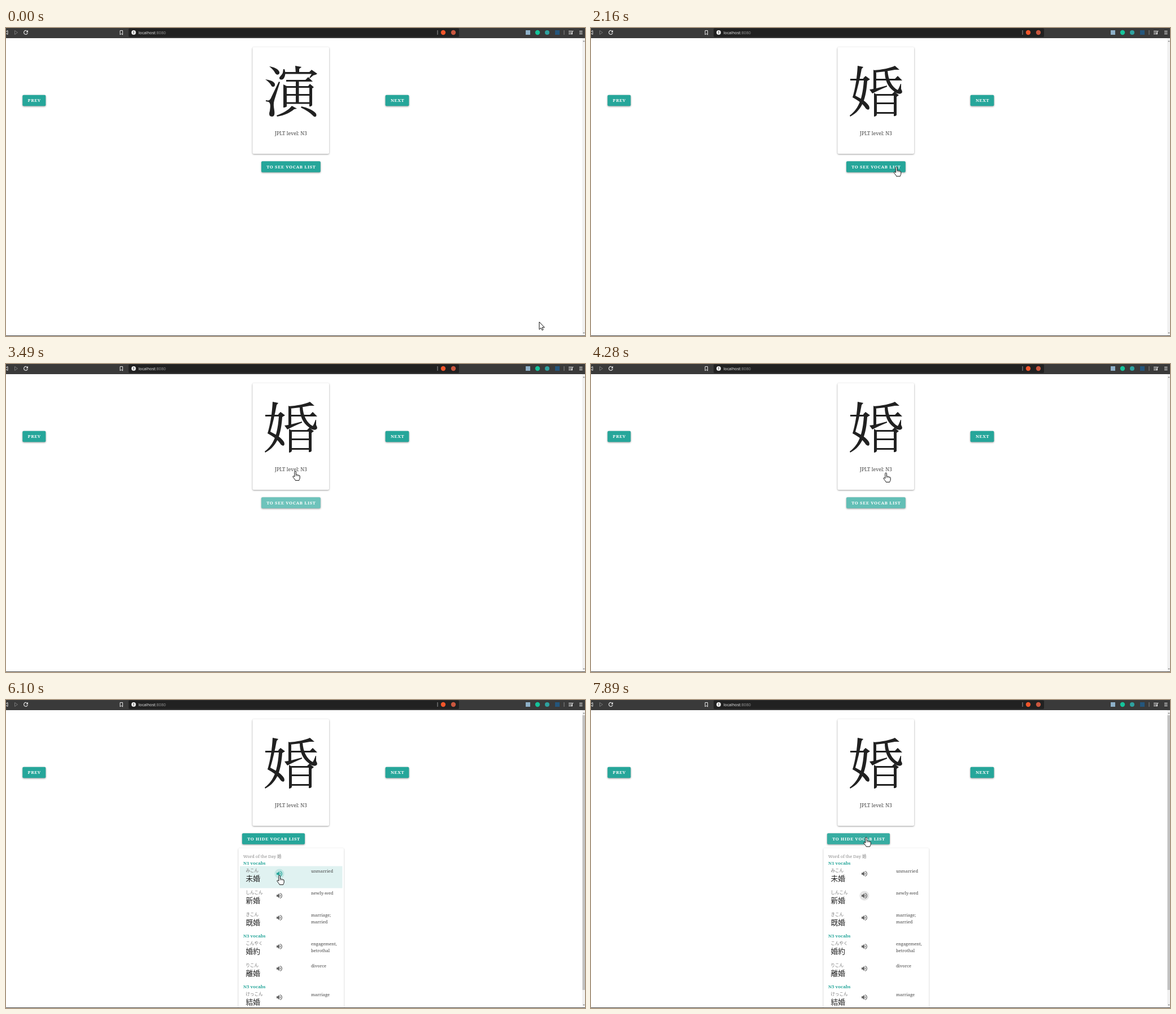
These frames come from a looping animation (1025x546 px, 8000 ms). An HTML page with a canvas:

```html
<!DOCTYPE html>
<html lang="ja">
<head>
<meta charset="utf-8">
<title>Kanji cards</title>
<style>
html, body { margin: 0; width: 100%; height: 100%; overflow: hidden; background: #fff; }
canvas { display: block; }
</style>
</head>
<body>
<canvas id="stage" width="1025" height="546"></canvas>
<script>
const ctx = document.getElementById('stage').getContext('2d');
const LOOP = 8000;
const TEAL = '#26a69a', INK = '#212121';
const SERIF = '"Noto Serif", "Noto Sans CJK JP", serif';
const CJK = '"Noto Sans CJK JP", "Noto Sans CJK", sans-serif';

// Times at which the page state switches
const SWAP = 1400;
const OPEN = [[2480, 3330], [5080, LOOP]];

const cursorKeys = [
  [0, 944, 521], [70, 944, 521], [810, 612, 157], [900, 612, 157], [1040, 662, 137],
  [1180, 692, 126], [1770, 692, 126], [2160, 540.5, 246.5], [2250, 535, 247], [2940, 535, 247],
  [3100, 497, 249], [3260, 497, 249], [3490, 512, 190], [3730, 521, 186], [3960, 521, 186],
  [4060, 522, 193], [4440, 522, 193], [4900, 531, 244], [5230, 531, 244], [5540, 484, 311],
  [6340, 484, 311], [6820, 485, 347], [7200, 485, 347], [7890, 487, 243.5]
];
const clicks = [
  [1300, 692, 127], [2400, 535, 247], [3240, 497, 249], [3960, 521, 186],
  [4950, 531, 245], [5850, 484, 309], [6960, 485, 347]
];
const nextGlow = [[1120, 0], [1200, .08], [1300, .08], [1380, .3], [1610, .24], [1770, .24], [2000, 0]];
const listGlow = [
  [2160, 0], [2250, .08], [2400, .08], [2480, .3], [2780, .24], [3260, .24], [3330, .36],
  [3490, .33], [3730, .28], [4440, .28], [4700, .08], [5000, .08], [5230, 0], [7780, 0], [7890, .08]
];

const groups = [
  ['N1 vocabs', 289, [
    ['みこん', '未婚', 'unmarried'],
    ['しんこん', '新婚', 'newly-wed'],
    ['きこん', '既婚', 'marriage;', 'married']]],
  ['N3 vocabs', 418, [
    ['こんやく', '婚約', 'engagement,', 'betrothal'],
    ['りこん', '離婚', 'divorce']]],
  ['N5 vocabs', 508, [
    ['けっこん', '結婚', 'marriage']]]
];

// Brush strokes of the two large characters; straight parts are [x, y, w, h]
const en = {
  curves: [
    'M466 68C473 69 482 72 484 78C485 84 478 84 476 79C474 75 470 71 466 68Z',
    'M459 91C466 92 474 94 476 99C477 105 471 106 469 101C467 97 463 94 459 91Z',
    'M460 128C465 129 467 129 470 122L483 95L485 96L475 128C473 134 474 140 475 146C476 153 475 157 471 157C466 157 465 153 467 147C468 140 469 134 465 131L460 130Z',
    'M512 67L523 69C522 71 519 71 519 74V80H513Z',
    'M491 73H493C495 79 495 84 492 89C489 93 483 92 484 88C485 85 489 83 490 79Z',
    'M493 78H537L541 74L551 81C549 83 546 83 544 84L538 89L537 88L541 81.5H493Z',
    'M496 92H530L535 87L543 95H496Z',
    'M491 100L497 103V139C495 141 491 141 491 141Z',
    'M535 103L538 99L545 105L542 107V137C540 140 537 139 537 139V106Z',
    'M506 138L515 143L510 144C503 150 493 155 480 157L479 155C490 151 500 146 506 138Z',
    'M523 139C533 141 545 146 549 152C551 158 546 159 543 155C538 150 531 145 522 141Z'
  ],
  bars: [[495, 103, 43, 3], [495, 117, 43, 3], [495, 131.5, 43, 3], [513, 93, 5.5, 40]]
};
const kon = {
  curves: [
    'M472 67L482 69C481 71 480 71 479 73C476 90 472 106 468 120C478 125 488 131 492 138C495 145 490 147 486 142C482 135 474 129 463 123C468 107 471 87 472 67Z',
    'M482 89L486 85L494 91L489 94C487 122 482 145 459 157L458 155C475 143 481 122 483 93Z',
    'M538 67L546 74L538 74C527 76 515 78 503 79L500 75C515 74 530 71 538 67Z',
    'M500 74L505 77V107L524 102V104C514 108 506 112 498 116L493 109L500 108Z',
    'M504 90H538L543 85L551 93H504Z',
    'M520 76L525 75C526 92 533 105 543 110C545 107 546 104 548 99H549V108C551 112 552 114 549 116C545 118 539 115 536 112C525 104 520 92 520 76Z',
    'M501 115L506 118V154C505 157 501 157 501 157Z',
    'M533 117L537 113L545 119L541 122V154C540 157 536 156 536 156V120Z'
  ],
  bars: [[459, 90, 26, 3], [505, 117, 32, 3], [505, 132, 32, 3], [505, 149, 32, 3]]
};

function makeGlyph({ curves, bars }) {
  const path = new Path2D();
  curves.forEach(d => path.addPath(new Path2D(d)));
  bars.forEach(([x, y, w, h]) => path.addPath(new Path2D(`M${x} ${y}h${w}v${h}h${-w}Z`)));
  return path;
}
const glyphs = [makeGlyph(en), makeGlyph(kon)];
const speaker = new Path2D('M3 9v6h4l5 5V4L7 9H3zm13.5 3c0-1.77-1.02-3.29-2.5-4.03v8.05c1.48-.73 2.5-2.25 2.5-4.02zM14 3.23v2.06c2.89.86 5 3.54 5 6.71s-2.11 5.85-5 6.71v2.06c4.01-.91 7-4.49 7-8.77s-2.99-7.86-7-8.77z');
const arrow = new Path2D('M0 0V13.4L3.1 10.7L5.1 14.8L7.1 13.9L5.2 9.8H9.3Z');
const hand = new Path2D('M-1.2 1.2C-1.2-.6 1.4-.6 1.4 1.2V6.5C2 5.8 3.6 6 3.8 7C4.5 6.3 6 6.6 6.2 7.6C7 7.2 8.2 7.6 8.2 8.8V12C8.2 14 7 14.6 6.8 16.4H.2C0 15-2.6 12.4-4 10.2C-4.6 9-3.2 8.2-2.2 9L-1.2 10Z');

const smooth = p => p * p * (3 - 2 * p);

// Interpolates the values that follow the time in each key
function track(keys, t, ease = p => p) {
  const i = keys.findIndex(k => k[0] > t);
  if (i === 0) return keys[0].slice(1);
  if (i < 0) return keys[keys.length - 1].slice(1);
  const a = keys[i - 1], b = keys[i], p = ease((t - a[0]) / (b[0] - a[0]));
  return a.slice(1).map((v, j) => v + (b[j + 1] - v) * p);
}

function rect(x, y, w, h, color) {
  ctx.fillStyle = color;
  ctx.fillRect(x, y, w, h);
}

function disc(x, y, r, color) {
  ctx.fillStyle = color;
  ctx.beginPath();
  ctx.arc(x, y, r, 0, Math.PI * 2);
  ctx.fill();
}

function line(d, color, width = 1) {
  ctx.strokeStyle = color;
  ctx.lineWidth = width;
  ctx.stroke(new Path2D(d));
}

function shape(d, color) {
  ctx.fillStyle = color;
  ctx.fill(new Path2D(d));
}

function text(s, x, y, font, color, { align = 'left', base = 'alphabetic', gap = 0 } = {}) {
  ctx.font = font;
  ctx.fillStyle = color;
  ctx.textAlign = align;
  ctx.textBaseline = base;
  ctx.letterSpacing = gap + 'px';
  ctx.fillText(s, x, y);
}

function panel(x, y, w, h, color, shade) {
  ctx.save();
  ctx.shadowColor = `rgba(0,0,0,${shade})`;
  ctx.shadowBlur = 3;
  ctx.shadowOffsetY = 1;
  ctx.fillStyle = color;
  ctx.beginPath();
  ctx.roundRect(x, y, w, h, 2);
  ctx.fill();
  ctx.restore();
}

function button(label, x, y, w, glow = 0) {
  const mix = c => Math.round(c + (255 - c) * glow);
  panel(x, y, w, 19.5, `rgb(${mix(38)},${mix(166)},${mix(154)})`, .4);
  text(label, x + 9.3, y + 12.6, `bold 7.7px ${SERIF}`, '#fff', { gap: .63 });
}

function toolbar() {
  const pale = '#e4e4e4';
  rect(0, 0, 1025, 18, '#3a3a3a');
  ctx.fillStyle = '#212121';
  ctx.beginPath();
  ctx.roundRect(217, 0.5, 585, 15.5, 2);
  ctx.fill();
  line('M-2 8L3 4.5V11.5Z', pale);
  line('M15.5 4.5V11.5L20.5 8Z', '#777');
  line('M37.9 6A3.4 3.4 0 1 0 38.4 8.5', pale, 1.2);
  shape('M39 3.8V7.5H35.3Z', pale);
  line('M202 4.5H206.5V12L204.2 10L202 12Z', pale);
  disc(226, 8, 3.9, '#f2f2f2');
  rect(225.5, 5.7, 1, 3, '#222');
  rect(225.5, 9.4, 1, 1, '#222');
  const font = '7.2px "Open Sans", sans-serif';
  text('localhost', 234.5, 10.8, font, '#f4f4f4');
  text(':8080', 264.6, 10.8, font, '#9a9a9a');
  rect(763.5, 4, 1, 8, '#999');
  disc(774, 8, 4.2, '#f0562b');
  disc(792, 8, 4.2, '#c9573f');
  rect(920, 4, 8, 8, '#8eb0c8');
  disc(941, 8, 4.2, '#15c39a');
  disc(958, 8, 4, '#2fa2a0');
  rect(972, 4, 8, 8, '#24567c');
  rect(987.5, 4, 1, 8, '#888');
  [5, 7.5, 10].forEach((y, i) => rect(996, y, i < 2 ? 6 : 4, 1, pale));
  line('M1002.5 10V5.5H1004.5', pale);
  disc(1001.7, 10.2, 1.3, pale);
  [5, 7.5, 10].forEach(y => rect(1015, y, 5.5, 1, pale));
}

function scrollbar(open) {
  rect(1020, 18, 5, 527, '#f1f1f1');
  if (open) rect(1020.5, 27, 4.5, 487, '#c1c1c1');
  shape('M1021.3 24.2L1023 22.2L1024.7 24.2Z', '#777');
  shape('M1021.3 539.8L1023 541.8L1024.7 539.8Z', '#777');
}

function vocabRow([kana, kanji, ...meaning], y, hot, focused) {
  if (hot) rect(414, y - 13.5, 181.5, 39, '#e0f2f1');
  if (focused) disc(484, y, 8.5, hot ? 'rgba(38,166,154,.17)' : 'rgba(0,0,0,.1)');
  ctx.save();
  ctx.translate(477.3, y - 6.72);
  ctx.scale(.56, .56);
  ctx.fillStyle = hot && focused ? TEAL : '#666';
  ctx.fill(speaker);
  ctx.restore();
  text(kana, 424.5, y - 5.5, `7.5px ${CJK}`, '#777', { base: 'middle' });
  text(kanji, 424.5, y + 8.3, `300 12.8px ${CJK}`, '#222', { base: 'middle' });
  meaning.forEach((m, i) => text(m, 540, y - 2.4 + i * 12, `7.5px ${SERIF}`, '#444'));
}

function vocabList(t, mx, my) {
  panel(411.5, 262.5, 186.5, 300, '#fff', .25);
  text('Word of the Day 婚', 420, 279.7, `7.5px ${SERIF}`, '#8a8a8a');
  groups.forEach(([title, top, rows]) => {
    rows.forEach((row, i) => {
      const y = top + 19 + i * 39;
      const hot = mx > 414 && mx < 595 && my >= y - 13.5 && my < y + 25.5;
      const over = Math.hypot(mx - 484, my - y) < 9;
      const pressed = t >= 6960 && y === 347;
      vocabRow(row, y, hot, over || pressed);
    });
    text(title, 420, top + 2.6, `bold 7.8px ${SERIF}`, TEAL);
  });
}

function isClickable(x, y, open) {
  const within = (l, top, r, b) => x >= l && x <= r && y >= top && y <= b;
  const icon = open && [308, 347, 386].some(cy => Math.hypot(x - 484, y - cy) < 9);
  return icon || within(672, 119, 713, 138) || within(436, 34, 572, 223) ||
    (open ? within(418, 236, 529, 256) : within(452, 236, 557, 256));
}

function pointer(x, y, open) {
  const path = isClickable(x, y, open) ? hand : arrow;
  ctx.save();
  ctx.translate(x, y);
  ctx.lineJoin = 'round';
  ctx.lineWidth = 1;
  ctx.fillStyle = '#fff';
  ctx.strokeStyle = '#111';
  ctx.fill(path);
  ctx.stroke(path);
  if (path === hand) line('M1.4 6.5V9M3.8 7V9.2M6.2 7.6V9.4', '#333', .7);
  ctx.restore();
}

function draw(t) {
  const [mx, my] = track(cursorKeys, t, smooth);
  const open = OPEN.some(([a, b]) => t >= a && t < b);
  const [glow] = track(listGlow, t);

  rect(0, 0, 1025, 546, '#fff');
  button('PREV', 29.3, 118.8, 41);
  button('NEXT', 671.6, 118.8, 41.8, track(nextGlow, t)[0]);
  panel(436.5, 34, 135.5, 189, '#fff', .4);
  ctx.fillStyle = INK;
  ctx.fill(glyphs[t < SWAP ? 0 : 1]);
  text('JPLT level: N3', 504.4, 189.5, `8.75px ${SERIF}`, '#444', { align: 'center' });

  if (open) {
    button('TO HIDE VOCAB LIST', 418, 236.3, 111, glow);
    vocabList(t, mx, my);
  } else {
    button('TO SEE VOCAB LIST', 452, 236.3, 104.8, glow);
  }

  scrollbar(open);
  toolbar();
  rect(0, 545, 1025, 1, '#4a4a4a');
  clicks.forEach(([at, x, y]) => {
    if (t >= at && t < at + 120) disc(x, y, 10, 'rgba(215,225,0,.65)');
  });
  pointer(mx, my, open);
}

function tick(now) {
  draw(now % LOOP);
  requestAnimationFrame(tick);
}
requestAnimationFrame(tick);
</script>
</body>
</html>
```
